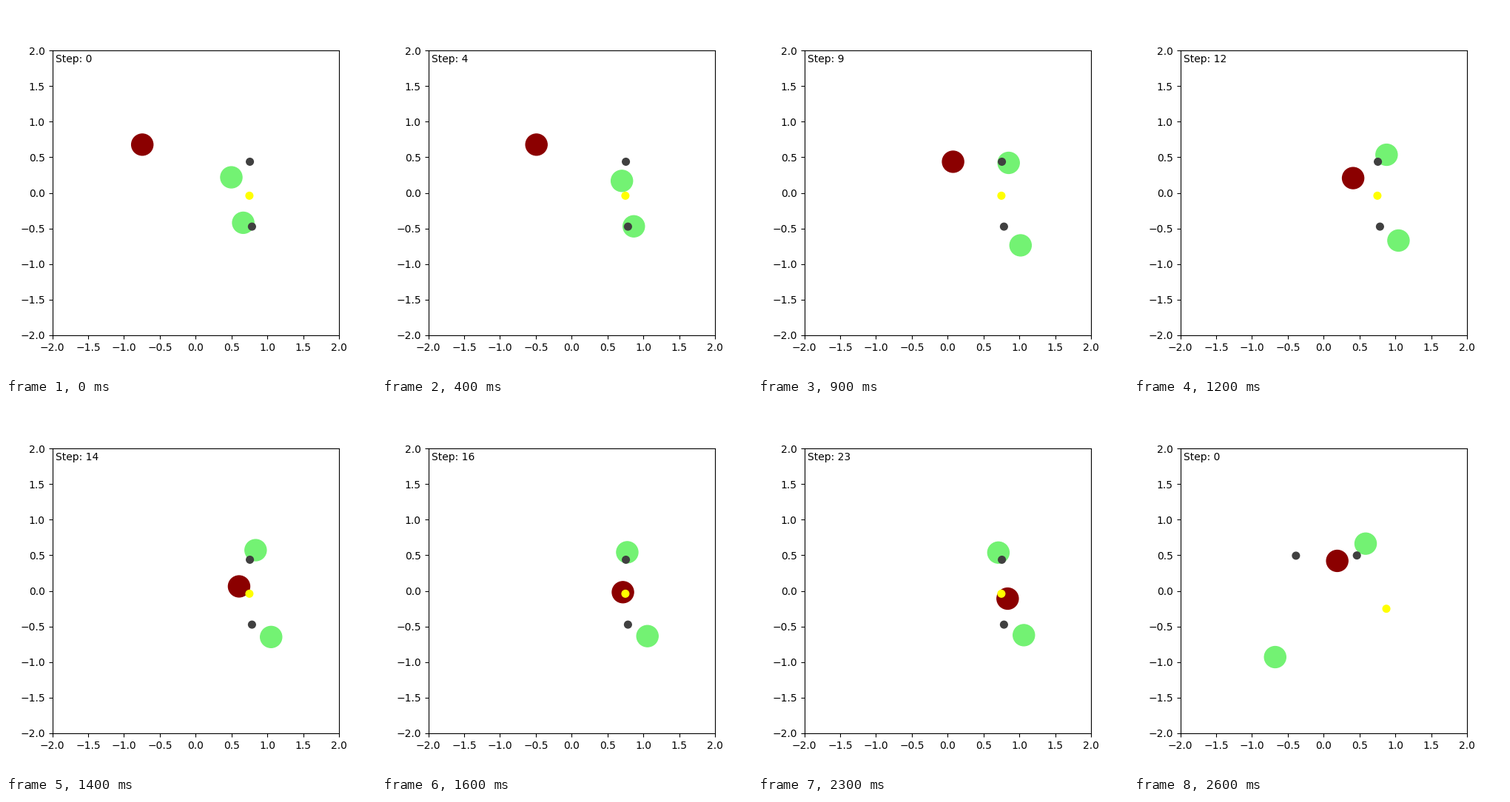
Write a matplotlib script that moves like this. It is 500 by 500 pixels and loops after 2.7 s.

```python
import numpy as np
import matplotlib.pyplot as plt
from matplotlib.animation import FuncAnimation

STEPS = 25
DT, DAMPING, FORCE = 0.1, 0.25, 5.0
MOVES = {"R": (1, 0), "L": (-1, 0), "U": (0, 1), "D": (0, -1), ".": (0, 0)}

RED, GREEN = "darkred", (0.45, 0.95, 0.45)
GREY, GOAL = (0.25, 0.25, 0.25), "yellow"


def walk(start, actions):
    """Positions of a damped particle pushed by one action per step."""
    pos, vel = np.array(start, float), np.zeros(2)
    path = [pos]
    for action in actions.ljust(STEPS, "."):
        vel = vel * (1 - DAMPING) + np.array(MOVES[action]) * FORCE * DT
        pos = pos + vel * DT
        path.append(pos)
    return path


# One entry per agent: first episode's path, then the next episode's start
paths = [
    walk((-0.744, 0.677), ".RRRDRRDRRDDR") + [(0.190, 0.421)],
    walk((0.498, 0.218), ".RRDUUUDU....L." + "DU" * 5) + [(0.586, 0.663)],
    walk((0.664, -0.420), ".RRDD....U") + [(-0.676, -0.930)],
]
# Landmarks stay put within an episode
landmarks = [
    [(0.757, 0.437), (-0.386, 0.494)],
    [(0.786, -0.474), (0.464, 0.497)],
    [(0.750, -0.040), (0.875, -0.251)],
]

fig, ax = plt.subplots(figsize=(5, 5), dpi=100)
ax.set_xlim(-2, 2)
ax.set_ylim(-2, 2)
label = ax.text(-1.95, 1.95, "", va="top", fontsize=10)


def add_circles(radius, colors):
    return [ax.add_patch(plt.Circle((0, 0), radius, color=c)) for c in colors]


agents = add_circles(0.15, [RED, GREEN, GREEN])
marks = add_circles(0.05, [GREY, GREY, GOAL])


def update(frame):
    episode, step = divmod(frame, STEPS + 1)
    for circle, path in zip(agents, paths):
        circle.center = tuple(path[frame])
    for circle, spots in zip(marks, landmarks):
        circle.center = spots[episode]
    label.set_text(f"Step: {step}")
    return [*agents, *marks, label]


anim = FuncAnimation(fig, update, frames=STEPS + 2, interval=100,
                     repeat=True, repeat_delay=0)
plt.show()
```
